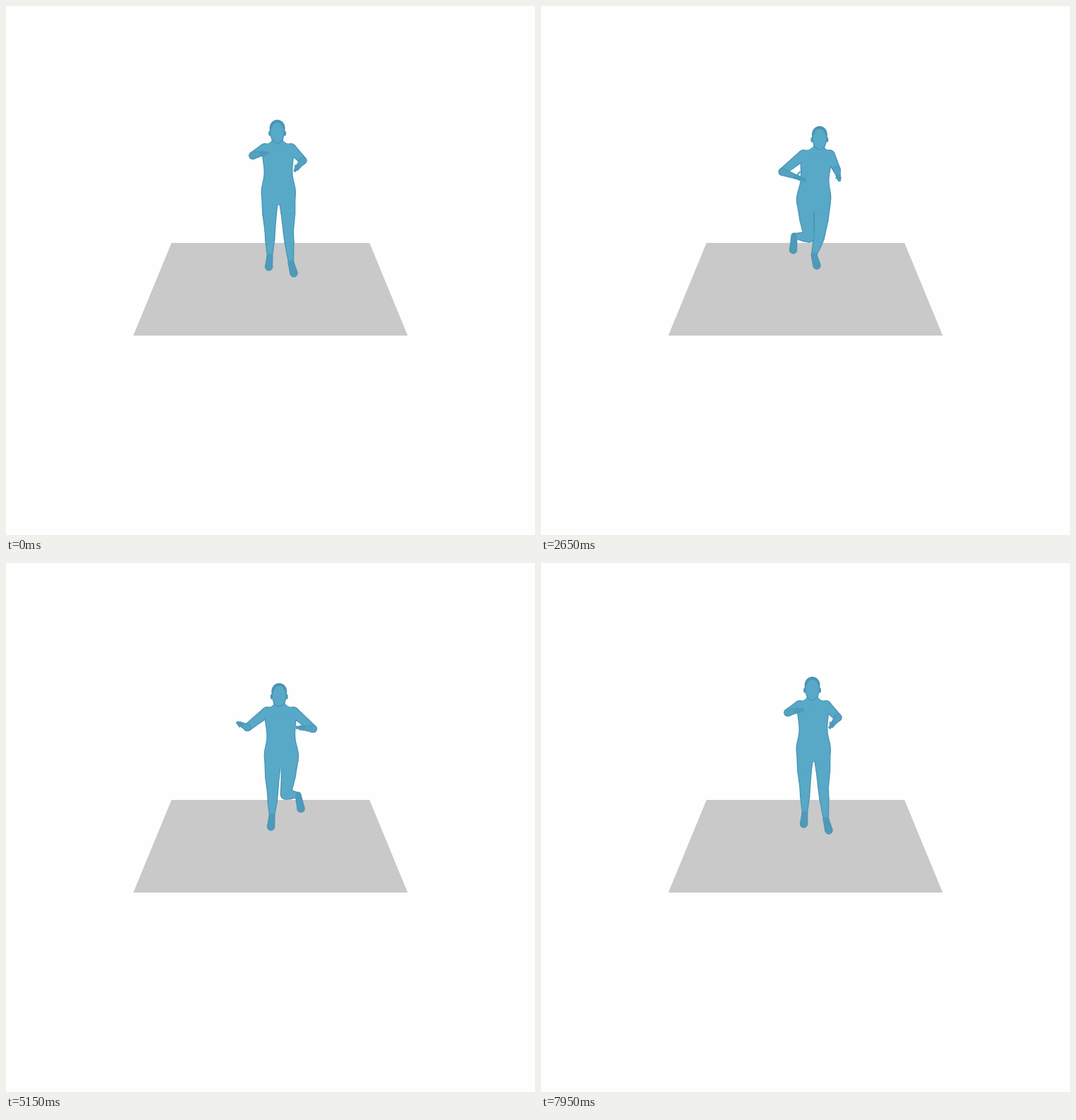
Write an HTML page with a canvas that moves like this. It is 748x748 px and loops after 8 s.

```html
<!DOCTYPE html>
<html lang="en">
<head>
<meta charset="utf-8">
<title>Dancing figure</title>
<style>
  html, body { margin: 0; width: 100%; height: 100%; overflow: hidden; background: #fefefe; }
  canvas { display: block; width: 748px; height: 748px; }
</style>
</head>
<body>
<canvas id="stage" width="748" height="748"></canvas>
<script>
const ctx = document.getElementById('stage').getContext('2d');
const LOOP = 8000, STEP = 50;
const RIM = '#4a94b3', SKIN = '#58a8c7', SHADE = '#4d9ab9', FOREARM = '#53a2c1';

// A pose is a neck point, two ankle points and two arms.
// Arms are elbow and fingertip, measured outward and down from the shoulder.
const wing = [[38, 12], [79, 27]];
const reach = { neck: [384, 197], feet: [[373, 354], [403, 363]],
  arms: [[[17, 10], [-5, 6]], [[17, 17], [5, 32]]] };
const spread = { neck: [383, 200], feet: [[353, 356], [382, 354]], arms: [wing, wing] };
const run = { neck: [392, 206], feet: [[358, 325], [386, 352]],
  arms: [[[30, 24], [-3, 36]], [[10, 21], [14, 37]]] };
const crossed = { neck: [376, 188], feet: [[369, 355], [380, 347]],
  arms: [[[20, 16], [-2, 8]], [[7, 23], [-33, 24]]] };
const kick = { neck: [387, 206], feet: [[376, 358], [413, 328]],
  arms: [[[28, 22], [43, 15]], [[28, 24], [4, 22]]] };
const droop = { neck: [390, 207], feet: [[381, 358], [427, 350]],
  arms: [[[39, 6], [47, 46]], [[24, 24], [23, 56]]] };

// Applies fn to matching numbers of equally shaped values.
function zip(fn, first, ...rest) {
  if (typeof first === 'number') return fn(first, ...rest);
  if (Array.isArray(first)) return first.map((v, i) => zip(fn, v, ...rest.map(r => r[i])));
  return Object.fromEntries(Object.keys(first).map(k => [k, zip(fn, first[k], ...rest.map(r => r[k]))]));
}
const blend = (a, b, k) => zip((u, v) => u + (v - u) * k, a, b);
const lift = (p, dy) => ({ ...p, neck: [p.neck[0], p.neck[1] - dy] });
const stretched = zip(v => v * 1.1, spread.arms);

const keys = [
  [0, reach],
  [1000, blend(reach, kick, .35)],
  [1650, spread],
  [1850, { ...lift(spread, -3), arms: stretched }],
  [2250, { ...blend(spread, run, .5), arms: droop.arms }],
  [2650, run],
  [3400, lift(crossed, 3)],
  [3600, crossed],
  [4300, blend(crossed, reach, .5)],
  [5150, kick],
  [5900, { ...blend(kick, droop, .5), arms: stretched }],
  [6400, droop],
  [6850, blend(droop, reach, .68)],
  [7400, lift(blend(crossed, reach, .6), 4)],
  [7950, reach]
];

function poseAt(t) {
  let i = 0;
  while (i < keys.length - 2 && t >= keys[i + 1][0]) i++;
  const [ta, a] = keys[i], [tb, b] = keys[i + 1];
  const [tp, before] = keys[i - 1] || keys[i], [tn, after] = keys[i + 2] || keys[i + 1];
  const span = tb - ta, k = (t - ta) / span, k2 = k * k, k3 = k2 * k;
  return zip((p, u, v, n) => {
    const m0 = .7 * (v - p) / (tb - tp) * span;
    const m1 = .7 * (n - u) / (tn - ta) * span;
    return u + (3 * k2 - 2 * k3) * (v - u) + (k3 - 2 * k2 + k) * m0 + (k3 - k2) * m1;
  }, before, a, b, after);
}

// Derives every joint from the few points of a pose.
function skeleton({ neck, feet, arms }) {
  const lean = .32 * (neck[0] - (feet[0][0] + feet[1][0]) / 2);
  const head = [neck[0] + .3 * lean, neck[1] - 20];
  const pelvis = [neck[0] - lean, neck[1] + 67];
  const sides = [-1, 1].map((s, i) => {
    const shoulder = [neck[0] - .35 * lean + s * 18.5, neck[1] + 4.5];
    const [elbow, tip] = arms[i].map(([out, down]) => [shoulder[0] + s * out, shoulder[1] + down]);
    const ankle = feet[i], raised = Math.max(0, 350 - ankle[1]);
    const hip = [pelvis[0] + s * 11.8, pelvis[1] + 5];
    const knee = [blend(hip, ankle, .35)[0] - s * .45 * raised, pelvis[1] + 54];
    const thigh = blend(hip, knee, .5);
    thigh[0] += s * .8;
    return {
      s, shoulder, elbow, tip, ankle,
      wrist: blend(elbow, tip, .58),
      toe: [ankle[0] + 1.3 + s * 2.7, ankle[1] + 15 + .2 * raised],
      leg: [hip, thigh, knee, blend(knee, ankle, .35), ankle]
    };
  });
  return { head, neck, pelvis, sides };
}

function dot([x, y], rx, ry = rx) {
  ctx.beginPath();
  ctx.ellipse(x, y, rx, ry, 0, 0, 7);
  ctx.fill();
}

// Chain of round joints joined by tapering segments.
function limb(points, radii, inset = 0) {
  points.forEach((p, i) => {
    const r = radii[i] - inset;
    dot(p, r);
    if (!i) return;
    const q = points[i - 1], s = radii[i - 1] - inset;
    const dx = p[0] - q[0], dy = p[1] - q[1], d = Math.hypot(dx, dy) || 1;
    const nx = -dy / d, ny = dx / d;
    ctx.beginPath();
    ctx.moveTo(q[0] + nx * s, q[1] + ny * s);
    ctx.lineTo(p[0] + nx * r, p[1] + ny * r);
    ctx.lineTo(p[0] - nx * r, p[1] - ny * r);
    ctx.lineTo(q[0] - nx * s, q[1] - ny * s);
    ctx.fill();
  });
}

function torso({ neck, pelvis, sides }, inset) {
  const outline = ({ s, shoulder: [x, y] }) => {
    // the spine bends most near the neck
    const at = (f, w) => [
      neck[0] + (pelvis[0] - neck[0]) * Math.sqrt(Math.max(0, f)) + s * (w - inset),
      neck[1] + (pelvis[1] - neck[1]) * f
    ];
    return [at(-.12, 7), at(-.04, 12), [x, y - 7 + inset], [x + s * (5 - inset), y + 4],
      at(.28, 22), at(.62, 19.5), at(.95, 25.5), at(1.15, 23.5), at(1.26, 6)];
  };
  const pts = [...outline(sides[1]), ...outline(sides[0]).reverse()];
  const mid = i => blend(pts[i], pts[(i + 1) % pts.length], .5);
  ctx.beginPath();
  ctx.moveTo(...mid(pts.length - 1));
  pts.forEach((p, i) => ctx.quadraticCurveTo(...p, ...mid(i)));
  ctx.fill();
}

function hand({ wrist, tip, s }) {
  const dx = tip[0] - wrist[0], dy = tip[1] - wrist[1];
  const len = Math.hypot(dx, dy), dir = Math.atan2(dy, dx);
  const palm = blend(wrist, tip, .4);
  limb([wrist, palm], [3.2, 3.4]);
  ctx.lineWidth = 2;
  ctx.lineCap = 'round';
  const finger = (from, angle, length) => {
    ctx.beginPath();
    ctx.moveTo(...from);
    ctx.lineTo(from[0] + Math.cos(angle) * length, from[1] + Math.sin(angle) * length);
    ctx.stroke();
  };
  for (let i = -1.5; i < 2; i++) finger(palm, dir + i * .18, len * .57);
  finger(wrist, dir + s * 1.25, Math.min(9, len * .6));
}

function drawFigure(figure) {
  const { head, neck, sides } = figure;
  const paint = color => { ctx.fillStyle = ctx.strokeStyle = color; };
  const offset = (x, y) => [head[0] + x, head[1] + y];

  const body = (color, inset) => {
    paint(color);
    for (const d of sides) {
      limb(d.leg, [12.4, 10.4, 7.8, 7.1, 4.1], inset);
      limb([d.shoulder, d.elbow], [7.6, 5.6], inset);
    }
    torso(figure, inset);
    limb([offset(0, 9), neck], [8, 8.5], inset);
  };
  const feet = (color, inset) => {
    paint(color);
    for (const d of sides) limb([d.ankle, d.toe], [4.5, 5.7], inset);
  };

  feet(RIM, 0);
  body(RIM, 0);
  body(SKIN, 1.3);
  feet(SHADE, 1);

  paint(RIM);
  for (const s of [-1, 1]) dot(offset(s * 10.6, 3), 1.8, 3.8);
  dot(offset(0, -4), 11, 12.2);
  dot(offset(0, 3), 10, 14.5);
  paint(SKIN);
  dot(offset(0, 2), 9.2, 14.2);

  for (const d of sides) {
    paint(RIM);
    limb([d.elbow, d.wrist], [5.5, 3.4]);
    paint(FOREARM);
    limb([d.elbow, d.wrist], [5.5, 3.4], 1);
    paint(SHADE);
    hand(d);
  }
}

function drawFloor() {
  ctx.fillStyle = '#c9c9c9';
  ctx.beginPath();
  ctx.moveTo(234, 335);
  ctx.lineTo(514, 335);
  ctx.lineTo(568, 466);
  ctx.lineTo(180, 466);
  ctx.fill();
}

const start = performance.now();
function frame(now) {
  const elapsed = Math.max(0, now - start) % LOOP;
  ctx.fillStyle = '#fefefe';
  ctx.fillRect(0, 0, 748, 748);
  drawFloor();
  drawFigure(skeleton(poseAt(Math.floor(elapsed / STEP) * STEP)));
  requestAnimationFrame(frame);
}
frame(start);
</script>
</body>
</html>
```
